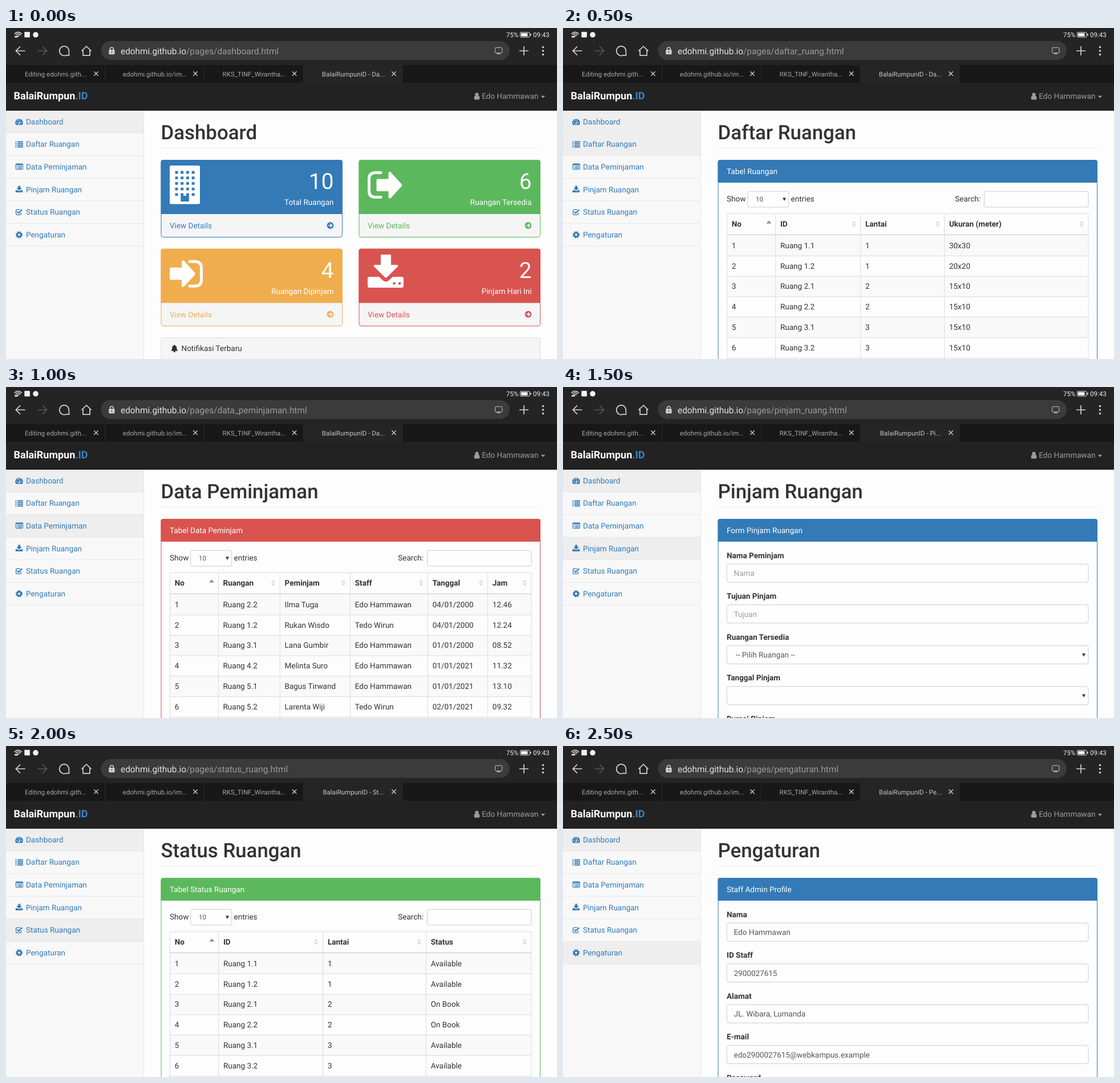
An HTML page that plays this animation: 966x580 px, repeating every 3 s.

```html
<!DOCTYPE html>
<html lang="id">
<head>
<meta charset="utf-8">
<title>Dashboard</title>
<style>
  html, body { margin: 0; width: 100%; height: 100%; overflow: hidden; background: #fdfdfd; }
  svg { display: block; width: 966px; height: 580px; }
  text { font-family: Roboto, "Open Sans", sans-serif; font-size: 13.53px; fill: #333;
         text-rendering: geometricPrecision; white-space: pre; }
  .b { font-weight: 700; }
  .h1 { font-size: 34.8px; font-weight: 500; }
  .num { font-size: 38.7px; }
  .url { font-size: 15.4px; }
  .tab { font-size: 11.5px; }
  .bar { font-size: 11.5px; }
  .logo { font-size: 18px; font-weight: 700; }
  .page { visibility: hidden; animation: show 3s step-end infinite; }
  @keyframes show {
    0% { visibility: visible; }
    16.667%, 100% { visibility: hidden; }
  }
</style>
</head>
<body>
<svg id="stage" viewBox="0 0 966 580"></svg>
<script>
const BLUE = '#337ab7', GREEN = '#5cb85c', AMBER = '#f0ad4e', RED = '#d9534f';
const PAPER = '#fdfdfd';
const SITE = 'edohmi.github.io', BRAND = 'BalaiRumpun', STAFF = 'Edo Hammawan';

// Drawing helpers
const text = (x, y, s, fill = '#333', cls = '', anchor = 'start') =>
  `<text x="${x}" y="${y}" fill="${fill}" style="fill:${fill}" class="${cls}" text-anchor="${anchor}">${s}</text>`;
const rect = (x, y, w, h, fill, r = 0, stroke = 'none') =>
  `<rect x="${x}" y="${y}" width="${w}" height="${h}" rx="${r}" fill="${fill}" stroke="${stroke}"/>`;
const dot = (x, y, r, fill) => `<circle cx="${x}" cy="${y}" r="${r}" fill="${fill}"/>`;
const fillPath = (d, fill) => `<path d="${d}" fill="${fill}"/>`;
const line = (d, stroke, w = 1, extra = '') =>
  `<path d="${d}" fill="none" stroke="${stroke}" stroke-width="${w}" ${extra}/>`;
const at = (x, y, s, body) => `<g transform="translate(${x} ${y}) scale(${s})">${body}</g>`;
const range = n => [...Array(n).keys()];

// Icons
const download = (color, hole) =>
  fillPath('M23 0h18v18h11q2 1 1 3L33.500 40q-1.500 1.500 -3 0L11 21q-1 -2 1 -3h11Z', color) +
  fillPath('M3 39h17l7 6.500q5 4 10 0l7 -6.500h16q3 0 3 3v13q0 3 -3 3h-57q-3 0 -3 -3v-13q0 -3 3 -3Z', color) +
  dot(46.5, 50.5, 2.3, hole) + dot(56, 50.5, 2.3, hole);
const bigArrow = 'M2 13h19v-11q1.500 -3 4 -1L44 22q1.500 2 0 4L25 46.500q-2.500 2 -4 -1v-11h-19q-2 0 -2 -2v-17.500q0 -2 2 -2Z';
const building = () => rect(287, 241, 53, 67.5, '#fff', 2.5) +
  range(20).map(i => rect(296.5 + i % 4 * 9.7, 250.6 + (i >> 2) * 9.7, 5, 4.8, BLUE, 1)).join('') +
  rect(306.3, 294, 14.6, 10, BLUE, 1);
const signOut = () => at(649.5, 251.5, 1, fillPath(bigArrow, '#fff')) +
  line('M657 253.500h-9q-11.500 0 -11.500 11v21q0 11 11.500 11h9', '#fff', 5, 'stroke-linecap="round"');
const signIn = () => at(287, 251, 1, fillPath(bigArrow, '#fff')) +
  line('M322 253.500h9q11.500 0 11.500 11v21q0 11 -11.500 11h-9', '#fff', 5, 'stroke-linecap="round"');
const tray = () => at(634, 241.3, 1, download('#fff', RED));
const goIcon = (x, y, c) => dot(x, y, 5.9, c) +
  line(`M${x - 3.5} ${y}h6M${x - .2} ${y - 3.2}l3.200 3.200l-3.200 3.200`, '#f5f5f5', 1.7);
const caret = (x, y, c = '#333') => fillPath(`M${x - 3} ${y - 2.5}h6l-3 5.500Z`, c);
const cross = x => line(`M${x - 3.7} 76.300l7.400 7.400m0 -7.400l-7.400 7.400`, '#d0d0d0', 1.3);

const menuIcons = [
  fillPath('M17.300 169.700A6.800 6.800 0 1 1 28.700 169.700Z', BLUE) +
    [[19, 166], [20.2, 162.6], [23, 161], [27, 166]].map(p => dot(...p, .9, '#eee')).join('') +
    line('M23 167.500L25.300 162.500', '#eee', 1.1) + dot(23, 167.3, 1.4, '#eee'),
  range(4).map(i => rect(16.5, 198.5 + i * 3, 2, 1.9, BLUE) + rect(20, 198.5 + i * 3, 10, 1.9, BLUE)).join(''),
  rect(17, 238.2, 12.6, 9.6, 'none', 1, BLUE) + rect(17, 237.7, 12.6, 2.6, BLUE) +
    [241.6, 243.6, 245.6].map(y => rect(18.6, y, 1.3, 1.1, BLUE) + rect(20.8, y, 7.4, 1.1, BLUE)).join(''),
  at(16.7, 276.5, .2, download(BLUE, '#f8f8f8')),
  line('M26.500 323.500v2.200q0 1.600 -1.600 1.600h-5.700q-1.600 0 -1.600 -1.600v-5.700q0 -1.600 1.600 -1.600h5.800', BLUE, 1.3) +
    line('M19.800 321.800l2.500 2.500l6 -6', BLUE, 2),
  `<circle cx="23" cy="362.300" r="3.400" fill="none" stroke="${BLUE}" stroke-width="2.800"/>` +
    `<circle cx="23" cy="362.300" r="5.200" fill="none" stroke="${BLUE}" stroke-width="2" stroke-dasharray="2.300 1.784"/>`
];

// Page parts
const ROW = 39.65;
const panel = (color, title) =>
  rect(272, 231.5, 664.5, 400, PAPER, 4, color) +
  fillPath('M271.500 271v-36q0 -4 4 -4h657.500q4 0 4 4v36Z', color) +
  text(287, 255.5, title, '#fff');

const card = (x, y, color, n, label, icon) => at(0, y, 1,
  rect(x + .5, 231.5, 317.5, 135, '#f5f5f5', 4, color) +
  fillPath(`M${x} 326v-91q0 -4 4 -4h310.500q4 0 4 4v91Z`, color) + icon() +
  text(x + 303, 282, n, '#fff', 'num', 'end') +
  text(x + 303, 310.3, label, '#fff', '', 'end') +
  text(x + 15.5, 351, 'View Details', color) + goIcon(x + 297, 346, color));

const dashboard = () =>
  card(271.5, 0, BLUE, 10, 'Total Ruangan', building) +
  card(618.5, 0, GREEN, 6, 'Ruangan Tersedia', signOut) +
  card(271.5, 155.7, AMBER, 4, 'Ruangan Dipinjam', signIn) +
  card(618.5, 155.7, RED, 2, 'Pinjam Hari Ini', tray) +
  rect(272, 542.5, 664.5, 60, '#f5f5f5', 4, '#ddd') +
  fillPath('M289 566q2.300 -1.800 2.300 -5.500q0 -4 3.200 -4.300v-1h1.500v1q3.200 .3 3.200 4.300q0 3.700 2.300 5.500Z', '#333') +
  dot(295.3, 566.8, 1.6, '#333') + text(307.5, 566.4, 'Notifikasi Terbaru');

function table(color, title, edges, heads, rows) {
  const right = i => edges[i + 1] ?? 921;
  let s = panel(color, title) + text(287, 303.7, 'Show') +
    rect(323.8, 286.3, 72, 27.6, '#fefefe', 3, '#ccc') + text(338, 303.8, '10', '#555', 'tab') +
    caret(388, 300) + text(399.5, 303.7, 'entries') +
    text(732, 303.7, 'Search:', '#333', '', 'end') +
    rect(738.5, 286.3, 182.5, 27.6, '#fefefe', 3, '#ccc');
  range(4).forEach(i => s += rect(287, 363 + i * 71.6, 634, 36, '#f9f9f9'));
  s += line('M287.500 580V325.500H921V580', '#ddd') + rect(287, 361.3, 634, 2, '#ddd');
  range(6).forEach(i => s += rect(287, 398.8 + i * 35.8, 634, 1, '#ddd'));
  edges.forEach((x, i) => {
    if (i) s += rect(x - .5, 325.5, 1, 260, '#ddd');
    s += text(x + 8.2, 348, heads[i], '#333', 'b');
    const m = right(i) - 11.8;
    s += i ? fillPath(`M${m - 4} 342.200h8l-4 -4.700ZM${m - 4} 344h8l-4 4.700Z`, '#dedede')
           : fillPath(`M${m - 4.5} 342.500h9l-4.500 -5Z`, '#8c8c8c');
    rows.forEach((r, k) => s += text(x + 8.2, 385.7 + k * 35.8, r[i]));
  });
  return s;
}

// Each field: label, value, colour, and whether it is a select
const form = (title, fields) => panel(BLUE, title) + fields.map(([label, value, color, select], i) => {
  const y = i * 71.5;
  return text(287, 299.7 + y, label, '#333', 'b') +
    rect(287.2, 310.2 + y, 633.8, 32, '#fefefe', 4, '#ccc') +
    text(select ? 303 : 299.5, 331.2 + y, value, color) +
    (select ? caret(913, 326.5 + y) : '');
}).join('');

const rooms = ['1.1', '1.2', '2.1', '2.2', '3.1', '3.2'];
const sizes = ['30x30', '20x20'];
const booked = [2, 3];
const aide = 'Tedo Wirun';
const loans = [
  ['Ruang 2.2', 'Ilma Tuga', STAFF, '04/01/2000', '12.46'],
  ['Ruang 1.2', 'Rukan Wisdo', aide, '04/01/2000', '12.24'],
  ['Ruang 3.1', 'Lana Gumbir', STAFF, '01/01/2000', '08.52'],
  ['Ruang 4.2', 'Melinta Suro', STAFF, '01/01/2021', '11.32'],
  ['Ruang 5.1', 'Bagus Tirwand', STAFF, '01/01/2021', '13.10'],
  ['Ruang 5.2', 'Larenta Wiji', aide, '02/01/2021', '09.32']
];

const pages = [
  ['Dashboard', 'dashboard', 'Da', dashboard()],
  ['Daftar Ruangan', 'daftar_ruang', 'Da',
    table(BLUE, 'Tabel Ruangan', [287.5, 372.7, 521.8, 668.7], ['No', 'ID', 'Lantai', 'Ukuran (meter)'],
      rooms.map((r, i) => [i + 1, 'Ruang ' + r, r[0], sizes[i] ?? '15x10']))],
  ['Data Peminjaman', 'data_peminjaman', 'Da',
    table(RED, 'Tabel Data Peminjam', [287.5, 372.3, 480.3, 603.6, 739.5, 844.6],
      ['No', 'Ruangan', 'Peminjam', 'Staff', 'Tanggal', 'Jam'], loans.map((r, i) => [i + 1, ...r]))],
  ['Pinjam Ruangan', 'pinjam_ruang', 'Pi', form('Form Pinjam Ruangan', [
    ['Nama Peminjam', 'Nama', '#999'],
    ['Tujuan Pinjam', 'Tujuan', '#999'],
    ['Ruangan Tersedia', '-- Pilih Ruangan --', '#555', true],
    ['Tanggal Pinjam', '', '#555', true],
    ['Durasi Pinjam', '', '#555', true]])],
  ['Status Ruangan', 'status_ruang', 'St',
    table(GREEN, 'Tabel Status Ruangan', [287.5, 372.7, 555.7, 736.5], ['No', 'ID', 'Lantai', 'Status'],
      rooms.map((r, i) => [i + 1, 'Ruang ' + r, r[0], booked.includes(i) ? 'On Book' : 'Available']))],
  ['Pengaturan', 'pengaturan', 'Pe', form('Staff Admin Profile', [
    ['Nama', STAFF, '#555'],
    ['ID Staff', '2900027615', '#555'],
    ['Alamat', 'JL. Wibara, Lumanda', '#555'],
    ['E-mail', 'edo2900027615@webkampus.example', '#555'],
    ['Password', '', '#555']])]
];

const page = ([title, file, tab, body], i) =>
  `<g class="page" style="animation-delay:${i * 500}ms">` +
  (i ? rect(0, 144.5 + i * ROW, 241, ROW - .5, '#eee') : '') +
  text(271.5, 194.6, title, '#333', 'h1') + body +
  text(201, 45.5, `${SITE}<tspan style="fill:#9b9b9b">/pages/${file}.html</tspan>`, '#e2e2e2', 'url') +
  text(609, 84.6, `${BRAND}ID - ${tab}...`, '#c4c4c4', 'tab', 'middle') + '</g>';

const statusBar = () =>
  line('M14.500 10.500q6.500 -6.500 13.500 0M16.800 12.500q4.500 -4.500 9 0M19 14.500q2.300 -2.300 4.600 0', '#e8e8e8', 1.3) +
  rect(15, 14.2, 6, 2.4, '#e8e8e8') +
  rect(32.3, 6.8, 9.6, 9.6, '#f2f2f2', 1) + dot(52, 11.8, 4.8, '#f2f2f2') +
  text(877, 16, '75%', '#eee', 'bar') +
  rect(901.5, 7.5, 16.5, 8.5, 'none', 1.5, '#e6e6e6') + rect(903, 9, 11.5, 5.5, '#fff') +
  rect(919, 10, 1.5, 3.5, '#e6e6e6') + text(924, 16, '09:43', '#eee', 'bar');

const toolbar = () =>
  rect(166.5, 23, 716.5, 33, '#3b3b3b', 16.5) +
  line('M33.500 40H17.500M25 32.300L17.300 40l7.700 7.700', '#d2d2d2', 1.7) +
  line('M55.500 40H71.500M64 32.300L71.700 40l-7.700 7.700', '#555', 1.7) +
  line('M106.500 47.200A8.300 8.300 0 1 1 110 42.500M106 47.800h4.500v-5', '#d2d2d2', 1.7) +
  line('M132.500 40.300L141 32l8.500 8.300M135 39v9.200h12V39', '#d2d2d2', 1.7, 'stroke-linejoin="round"') +
  rect(180.3, 38.3, 10.2, 8, '#d2d2d2', 1) +
  line('M182.500 38.500v-1.700a2.900 2.900 0 0 1 5.800 0v1.700', '#d2d2d2', 1.5) + dot(185.4, 42.2, 1.1, '#3b3b3b') +
  rect(857.7, 34.3, 12.2, 9.4, 'none', 1.5, '#c8c8c8') + rect(860.5, 44.5, 6.6, 1.3, '#c8c8c8') +
  line('M900 40h16M908 32v16', '#d2d2d2', 1.7) +
  [33.5, 40, 46.5].map(y => dot(941.5, y, 1.8, '#d2d2d2')).join('');

const tabs = () => rect(0, 65, 966, 31, '#181818') + rect(521.5, 65, 174, 31, '#252525') +
  [173.5, 347.5, 521.5].map(x => rect(x - .5, 66, 1, 29, '#2b2b2b')).join('') +
  [[87, 'Editing edohmi.gith...'], [261, SITE + '/im...'], [435, 'RKS_TINF_Wirantha...']]
    .map(([x, s]) => text(x, 84.6, s, '#a6a6a6', 'tab', 'middle')).join('') +
  [158, 332, 505.7, 680].map(cross).join('');

const navbar = () => rect(0, 96, 966, 48, '#222') + rect(0, 143.6, 966, 1.2, '#0a0a0a') +
  text(13.5, 124.5, `${BRAND}<tspan style="fill:#3b83c4">.ID</tspan>`, '#fff', 'logo') +
  dot(825.5, 116.6, 3.1, '#9d9d9d') +
  fillPath('M820.600 123.500q0 -5 2.600 -5.200q2.300 2.200 4.600 0q2.700 .2 2.700 5.200q0 2 -2 2h-5.900q-2 0 -2 -2Z', '#9d9d9d') +
  text(834.3, 124.2, STAFF, '#9d9d9d') + fillPath('M937.700 118.800h7.600l-3.800 4Z', '#9d9d9d');

const menu = () => pages.map(([title], i) =>
  rect(0, 183.4 + i * ROW, 241, 1, '#e7e7e7') + menuIcons[i] +
  text(35, 168.7 + i * ROW, title, BLUE)).join('');

document.getElementById('stage').innerHTML =
  rect(0, 0, 966, 580, PAPER) + rect(0, 0, 966, 66, '#242424') +
  rect(0, 144, 241, 436, '#f8f8f8') + rect(0, 144.5, 241, ROW, '#eee') + rect(241, 144, 1, 436, '#e7e7e7') +
  rect(271.5, 210, 665.5, 1, '#eee') +
  statusBar() + toolbar() + tabs() + navbar() + pages.map(page).join('') + menu();
</script>
</body>
</html>
```
